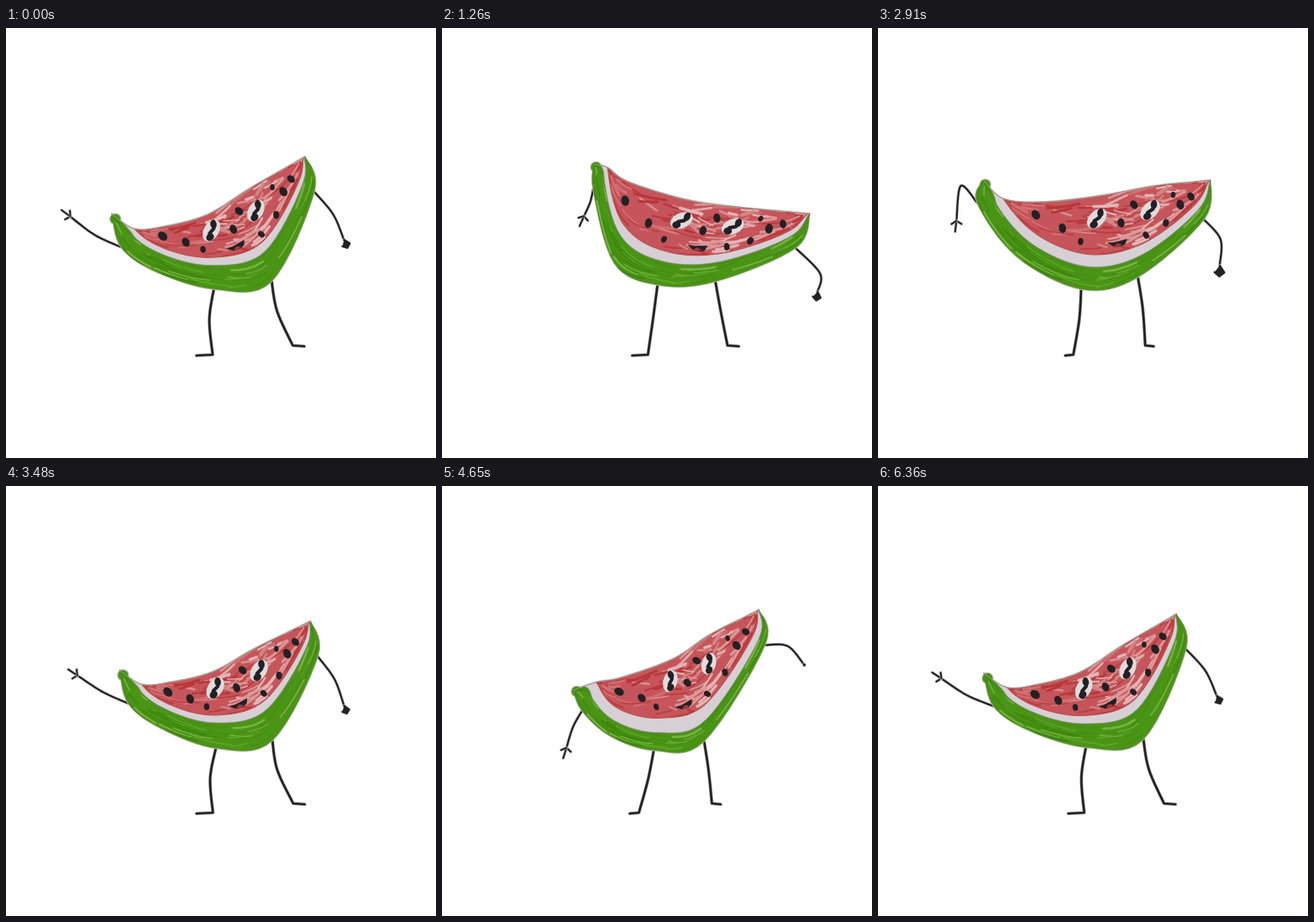
Animation, 512 px wide and 512 px high, one loop 6.39 s. Source, as an HTML page with a canvas:

```html
<!DOCTYPE html>
<html>
<head>
<meta charset="utf-8">
<title>Dancing watermelon</title>
<style>
html, body { margin: 0; width: 100%; height: 100%; overflow: hidden; background: #fff; }
canvas { display: block; width: 100vw; height: 100vh; object-fit: contain; }
</style>
</head>
<body>
<canvas id="stage" width="512" height="512"></canvas>
<script>
const ctx = document.getElementById('stage').getContext('2d');
const LOOP = 6390, STEP = 30;

// The slice is a row of ribs running from the top edge down to the rind.
// top: left tip, four ribs, right tip; rind: left shoulder, belly, hips, right shoulder.
// armL, armR: angle and length of both halves; legs: stride and knee bend.
// skin: flesh depth and pale rim; look: eye tilt and size of the right hand.
const lean = {
  top: [126,221, 153,239, 189,236, 240,222, 290,191, 356,153],
  rind: [137,261, 178,290, 248,311, 316,302, 367,195],
  armL: [205, 35, 217, 36], armR: [50, 35, 67, 33],
  legs: [0.95, -5], skin: [0.58, 0.25], look: [-72, 0.8]
};
const flat = {
  top: [182,162, 197,166, 222,183, 290,204, 352,213, 438,221],
  rind: [180,192, 205,280, 257,306, 325,302, 421,262],
  armL: [103, 16, 114, 18], armR: [46, 42, 98, 22],
  legs: [0.9, 0], skin: [0.62, 0.3], look: [-34, 0.8]
};
const rise = {
  top: [140,270, 172,253, 207,240, 268,204, 306,163, 351,121],
  rind: [156,291, 195,307, 249,316, 306,303, 369,163],
  armL: [105, 23, 88, 27], armR: [-23, 23, 26, 28],
  legs: [0, 4], skin: [0.68, 0.55], look: [-110, 0]
};
const smile = {
  top: [126,181, 149,203, 195,207, 262,200, 328,188, 396,181],
  rind: [118,208, 165,272, 242,311, 309,297, 388,228],
  armL: [226, 28, 97, 42], armR: [50, 31, 92, 31],
  legs: [0.2, 2], skin: [0.63, 0.35], look: [-57, 1]
};
const point = {
  top: [202,196, 221,206, 239,209, 287,213, 336,215, 417,220],
  rind: [203,233, 224,274, 268,320, 323,311, 406,264],
  armL: [190, 23, 167, 31], armR: [77, 27, 97, 34],
  legs: [1, -8], skin: [0.52, 0.15], look: [-43, 0.5]
};
const turn = {
  top: [150,251, 180,238, 214,224, 264,202, 297,192, 326,190],
  rind: [169,277, 205,299, 260,322, 307,303, 350,233],
  armL: [114, 20, 68, 35], armR: [4, 16, 31, 18],
  legs: [0.05, 5], skin: [0.57, 0.45], look: [-130, 0.9]
};

// Places on the flesh: rib number and share of the flesh depth; seeds add a radius.
const SEEDS = [
  [2, 0.48, 5.6], [2.52, 0.62, 5.2], [2.85, 0.8, 3.8], [3.68, 0.26, 5], [3.5, 0.52, 5],
  [4.45, 0.27, 3.3], [4.84, 0.58, 4.7], [4.6, 0.62, 5.4], [4.35, 0.85, 4.3], [4.02, 0.87, 4]
];
const EYES = [[3.05, 0.39], [4.02, 0.43]], MOUTH = [3.5, 0.84];

function blend(fn, ...poses) {
  const out = {};
  for (const part in lean) out[part] = lean[part].map((_, i) => fn(...poses.map(p => p[part][i])));
  return out;
}
const mix = (p, q, k) => blend((a, b) => a + (b - a) * k, p, q);

const keys = [
  [0, lean], [1260, flat], [1920, rise], [2430, turn], [2910, smile],
  [3360, mix(smile, lean, 0.9)], [4050, point], [4330, mix(point, flat, 0.35)],
  [4820, rise], [5280, turn], [5970, mix(mix(rise, turn, 0.3), lean, 0.45)]
];
function keyAt(i) {
  const lap = Math.floor(i / keys.length), [t, p] = keys[i - lap * keys.length];
  return { t: t + lap * LOOP, p };
}

// Smooth cubic through the keys, with slopes weighted by key spacing.
function poseAt(t) {
  let i = keys.length - 1;
  while (keys[i][0] > t) i--;
  const [a, b, c, d] = [i - 1, i, i + 1, i + 2].map(keyAt);
  const g = b.t - a.t, h = c.t - b.t, f = d.t - c.t, s = (t - b.t) / h, r = 1 - s;
  return blend((v0, v1, v2, v3) => {
    const d0 = (v1 - v0) / g, d1 = (v2 - v1) / h, d2 = (v3 - v2) / f;
    const m1 = (d0 * h + d1 * g) / (g + h) * h, m2 = (d1 * f + d2 * h) / (h + f) * h;
    return (1 + 2 * s) * r * r * v1 + s * r * r * m1 + s * s * (3 - 2 * s) * v2 - s * s * r * m2;
  }, a.p, b.p, c.p, d.p);
}

const pairs = a => Array.from({ length: a.length / 2 }, (_, i) => [a[2 * i], a[2 * i + 1]]);
const between = (a, b, k) => [a[0] + (b[0] - a[0]) * k, a[1] + (b[1] - a[1]) * k];
const polar = ([x, y], deg, r) => [x + r * Math.cos(deg * Math.PI / 180), y + r * Math.sin(deg * Math.PI / 180)];

// Dense Catmull-Rom curve, eight steps per span.
function curve(p) {
  const n = p.length, out = [];
  for (let i = 0; i < n - 1; i++) {
    const q = [p[Math.max(0, i - 1)], p[i], p[i + 1], p[Math.min(n - 1, i + 2)]];
    for (let k = 0; k < 8; k++) {
      const s = k / 8;
      out.push([0, 1].map(c => {
        const [w, x, y, z] = q.map(v => v[c]);
        return x + 0.5 * s * (y - w + s * (2 * w - 5 * x + 4 * y - z + s * (3 * (x - y) + z - w)));
      }));
    }
  }
  return out.concat([p[n - 1]]);
}
function at(line, u) {
  const f = Math.min(line.length - 1, Math.max(0, u * 8));
  const i = Math.min(line.length - 2, Math.floor(f));
  return between(line[i], line[i + 1], f - i);
}
const sample = (fn, from, to, n = 50) => Array.from({ length: n + 1 }, (_, i) => fn(from + (to - from) * i / n));

function path(line, close) {
  ctx.beginPath();
  line.forEach(([x, y]) => ctx.lineTo(x, y));
  if (close) ctx.closePath();
}
function stroke(line, color, width, close) {
  path(line, close);
  ctx.strokeStyle = color;
  ctx.lineWidth = width;
  ctx.stroke();
}
function fill(line, color) {
  path(line, true);
  ctx.fillStyle = color;
  ctx.fill();
}
function oval(x, y, rx, ry, turned, color) {
  ctx.beginPath();
  ctx.ellipse(x, y, rx, ry, turned, 0, 2 * Math.PI);
  ctx.fillStyle = color;
  ctx.fill();
}

let seed = 11;
const rnd = () => (seed = (seed * 16807) % 2147483647) / 2147483647;
const streaks = (n, colors, [from, to], len, slant, width) => Array.from({ length: n }, () => ({
  u: from + (to - from) * rnd(), v: rnd(), du: len * (0.4 + rnd()), dv: (rnd() - 0.5) * slant,
  color: colors[Math.floor(rnd() * colors.length)], w: width * (0.5 + rnd())
}));
const redMarks = streaks(80, ['#b8363b', '#c2454a', '#d07073', '#d98f90', '#bb3a3f'], [0.9, 5.8], 0.45, 0.25, 2.2);
const pinkMarks = streaks(40, ['#dc9798', '#e0a9a9', '#d48485', '#e3b5b5'], [2.8, 4.7], 0.3, 0.25, 2.6);
const greenMarks = streaks(60, ['#3c870c', '#458f12', '#61a82b', '#78b443', '#418b0e'], [0, 5.8], 0.6, 0.25, 1.8);

// place(u, v) maps a streak onto its part of the slice.
function hatch(marks, place) {
  for (const m of marks) stroke(sample(k => place(m.u + m.du * k, m.v + m.dv * k), 0, 1, 4), m.color, m.w);
}

const INK = '#232123', HALO = '#b4afad';
function limb(line, width) {
  stroke(line, HALO, width + 1.3);
  stroke(line, INK, width);
}

function leg(hip, ankle, bend, toe) {
  const knee = between(hip, ankle, 0.46);
  const line = curve([[hip[0], hip[1] - 3], [knee[0] + bend, knee[1]], ankle]);
  limb(line.concat([[ankle[0] + toe, ankle[1] + 1]]), 2.7);
}

function arm(shoulder, [a, m, b, n]) {
  const elbow = polar(shoulder, a, m), hand = polar(elbow, b, n);
  limb(curve([shoulder, elbow, hand]), 2.1);
  return hand;
}

function arms(p, left, right) {
  const fork = arm(left, p.armL), fist = arm(right, p.armR);
  for (const spread of [-65, 0, 50]) {
    limb([fork, polar(fork, p.armL[2] + spread, spread ? 7 : 13)], 2);
  }
  const size = Math.max(0, p.look[1]), dir = p.armR[2];
  if (size > 0.05) {
    const out = (turned, r) => polar(fist, dir + turned, r * size);
    limb([out(0, 0), out(-35, 10), out(0, 13), out(35, 10)], 2);
    fill([out(0, 0), out(-35, 11), out(0, 13), out(35, 11)], INK);
  }
}

function local([x, y], angle, scale, paint) {
  ctx.save();
  ctx.translate(x, y);
  ctx.rotate(angle);
  ctx.scale(scale, scale);
  paint();
  ctx.restore();
}
function eye() {
  oval(0, 0, 14, 9, 0.2, '#e0dbdd');
  stroke([[-10, 1], [-4, -1], [3, 2], [11, -1]], INK, 4.2);
  oval(-8, 1, 5, 4.2, 0.5, INK);
  oval(8, 0, 5.2, 3.8, -0.5, INK);
}
function mouth() {
  fill([[-12, -2], [-4, -1], [4, -2], [12, -3], [9, 3], [3, 5], [-5, 4]], INK);
  fill([[-5, 3.5], [0, 0.5], [5, 3], [2, 4.8]], '#a23a3e');
}

function draw(p) {
  ctx.fillStyle = '#fff';
  ctx.fillRect(0, 0, 512, 512);
  ctx.lineCap = ctx.lineJoin = 'round';

  const topPts = pairs(p.top), rindPts = pairs(p.rind);
  const tipL = topPts[0], tipR = topPts[5];
  topPts.splice(5, 0, between(topPts[4], tipR, 0.7));
  const top = curve(topPts), rind = curve([tipL, ...rindPts, tipR]);
  const rib = (u, v) => between(at(top, u), at(rind, u), v);

  const [depth, rim] = p.skin;
  const redDepth = u => depth * (1 - Math.min(1, Math.abs((2 * u - 7) / 5)) ** 3);
  const paleDepth = u => {
    const d = redDepth(u);
    return (d + (1 - d) * rim) * Math.min(1, Math.max(0, (u - 0.5) / 0.6));
  };
  const inFlesh = (u, v) => rib(u, v * redDepth(u));

  const stride = p.legs[0], bend = p.legs[1];
  leg(rindPts[2], [229 + 18 * stride, 389], bend, -7 - 13 * stride);
  leg(rindPts[3], [312 + 31 * stride, 378], bend, 9 + 5 * stride);
  arms(p, rindPts[0], rindPts[4]);

  const body = top.concat(rind.slice().reverse());
  const knob = between(tipL, rib(1, 0.5), 0.22);
  oval(...knob, 7, 7, 0, HALO);
  stroke(body, HALO, 1.8, true);
  oval(...knob, 6, 6, 0, '#4a9416');
  ctx.save();
  fill(body, '#4a9416');
  ctx.clip();
  hatch(greenMarks, (u, v) => rib(u, paleDepth(u) + (1 - paleDepth(u)) * v));

  const roof = sample(u => rib(u, 0), 6, 0.5);
  const pale = sample(u => rib(u, paleDepth(u)), 0.5, 6);
  const flesh = sample(u => rib(u, redDepth(u)), 1, 6);
  fill(pale.concat(roof), '#d6d0d4');
  stroke(pale, '#858a80', 0.8);

  ctx.save();
  fill(flesh.concat(sample(u => rib(u, 0), 6, 1)), '#c5555a');
  ctx.clip();
  hatch(redMarks, inFlesh);
  hatch(pinkMarks, inFlesh);
  ctx.restore();
  stroke(flesh, '#bd4c50', 1.2);

  const [l, r] = EYES.map(e => inFlesh(...e));
  const tilt = p.look[0] * Math.PI / 180;
  const size = Math.min(1, Math.hypot(r[0] - l[0], r[1] - l[1]) / 54);
  local(l, tilt, size, eye);
  local(r, tilt, size, eye);
  SEEDS.forEach(([u, v, radius], i) => {
    const k = radius * (0.4 + 0.6 * size);
    oval(...inFlesh(u, v), k * 1.1, k * 0.84, tilt + 2 + (i % 3) * 0.35, INK);
  });
  local(inFlesh(...MOUTH), Math.atan2(r[1] - l[1], r[0] - l[0]), size, mouth);
  stroke(top, '#a89b99', 1.5);
  ctx.restore();
}

let shown = -1;
const start = performance.now();
function frame(now) {
  let t = Math.floor((Math.max(0, now - start) % LOOP) / STEP) * STEP;
  if (t < 60) t = 0;
  if (t !== shown) draw(poseAt(shown = t));
  requestAnimationFrame(frame);
}
frame(start);
</script>
</body>
</html>
```
